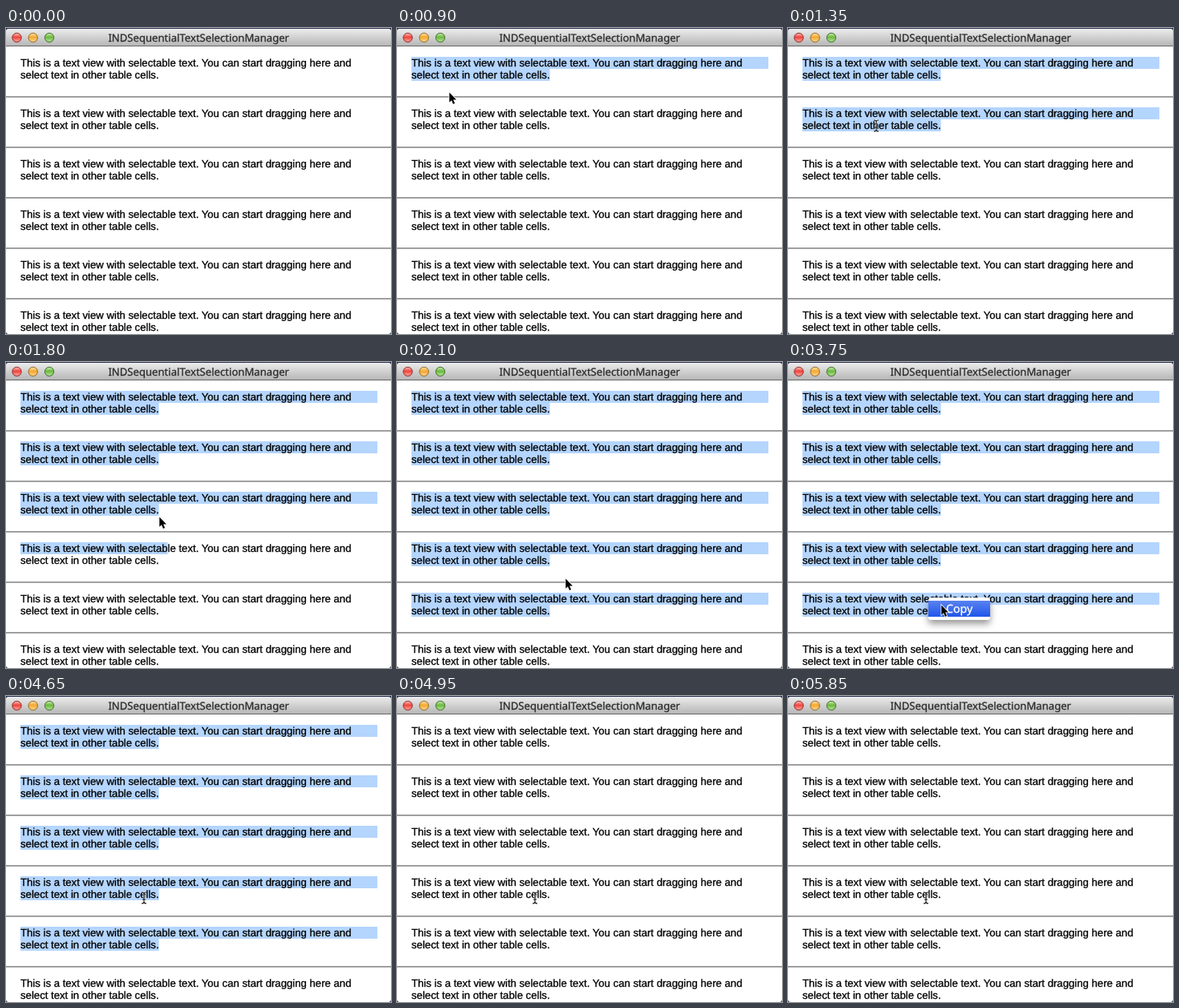
An HTML page for the animation above (6000 ms loop, 480 px wide and 382 px high).

```html
<!DOCTYPE html>
<html lang="en">
<head>
<meta charset="utf-8">
<title>Text selection across table cells</title>
<style>
  html, body { margin: 0; width: 100%; height: 100%; overflow: hidden; background: #fff; }
  svg { display: block; width: 100vw; height: 100vh; }
  text { text-rendering: geometricPrecision; white-space: pre; stroke-width: .3px; }
  .cell { font: 13.16px "Liberation Sans", Arial, sans-serif; fill: #000; stroke: #000; }
  .title { font: 13.12px "Noto Sans", sans-serif; fill: #2c2c2c; stroke: #2c2c2c; text-anchor: middle; }
  .item { font: 14.2px "Noto Sans", sans-serif; }
  .selection { fill: #b4d5fe; }
  .rule { fill: #808080; }
</style>
</head>
<body>
<svg viewBox="0 0 480 382" preserveAspectRatio="none">
  <defs>
    <linearGradient id="bar" x2="0" y2="1">
      <stop stop-color="#ececec"/><stop offset="1" stop-color="#b4b4b4"/>
    </linearGradient>
    <linearGradient id="blue" x2="0" y2="1">
      <stop stop-color="#5a83f0"/><stop offset="1" stop-color="#1f56ea"/>
    </linearGradient>
    <linearGradient id="gloss" x2="0" y2="1">
      <stop stop-color="#fff" stop-opacity=".6"/>
      <stop offset=".45" stop-color="#fff" stop-opacity="0"/>
      <stop offset="1" stop-color="#fff" stop-opacity=".5"/>
    </linearGradient>
    <filter id="shadow" x="-30%" y="-50%" width="160%" height="240%">
      <feDropShadow dx="0" dy="5" stdDeviation="4.5" flood-opacity=".4"/>
    </filter>
    <clipPath id="window"><rect y="1" width="480" height="381" rx="3.5"/></clipPath>
  </defs>

  <rect width="480" height="382" fill="#29304f"/>
  <g clip-path="url(#window)">
    <rect width="480" height="382" fill="#fff"/>
    <rect y="1" width="480" height="22" fill="url(#bar)"/>
    <rect y="22" width="480" height="1" fill="#686868"/>
    <g id="buttons"></g>
    <text class="title" x="240.2" y="16.5">INDSequentialTextSelectionManager</text>
    <g id="rows"></g>
  </g>

  <g id="menu">
    <rect x="175" y="294" width="77" height="28" rx="4" fill="#fff" filter="url(#shadow)"/>
    <rect id="highlight" x="175" y="298" width="77" height="20" fill="url(#blue)"/>
    <text id="copy" class="item" x="197" y="313">Copy</text>
  </g>

  <g id="arrow">
    <path d="M.3 .5V12.8L3 10.2 5 15 7.1 14.1 5.1 9.4H9Z"
          fill="#000" stroke="#fff" stroke-width="1.6" paint-order="stroke"/>
  </g>
  <g id="beam" fill="none">
    <path d="M-3-7Q0-7 0-5Q0-7 3-7M0-5V5M-3 7Q0 7 0 5Q0 7 3 7M-2 2H2" stroke="#fff" stroke-width="2.6" stroke-opacity=".7"/>
    <path d="M-3-7Q0-7 0-5Q0-7 3-7M0-5V5M-3 7Q0 7 0 5Q0 7 3 7M-2 2H2" stroke="#111" stroke-width="1.1"/>
  </g>
</svg>
<script>
const STEP = 150, LOOP = 6000;
const LEFT = 18, RIGHT = 463, TOP = 36, PITCH = 63, LINE = 15;
const LINES = [
  "This is a text view with selectable text. You can start dragging here and",
  "select text in other table cells."
];

// Pointer positions: [time, x, y], each held until the next one.
const PATH = [
  [150, 19, 44], [450, 24, 46], [600, 40, 53], [750, 56, 67], [900, 65, 80],
  [1050, 70, 92], [1200, 85, 104], [1350, 110, 122], [1500, 140, 146],
  [1650, 168, 170], [1800, 191, 193], [1950, 202, 232], [2100, 210, 270],
  [2250, 214, 304], [2400, 216, 328], [3000, 208, 322], [3150, 192, 308],
  [3300, 178, 296], [3450, 174, 293], [3750, 191, 303], [4350, 186, 285],
  [4500, 175, 262], [4650, 172, 252]
];
const DRAG_END = 2400, MENU_CLICK = 3150, MENU_OPEN = 3600, MENU_PICK = 3750,
      MENU_FADE = 4050, MENU_GONE = 4200, DESELECT = 4800;

const $ = id => document.getElementById(id);

function add(parent, tag, attrs, content = "") {
  const node = document.createElementNS("http://www.w3.org/2000/svg", tag);
  for (const key in attrs) node.setAttribute(key, attrs[key]);
  node.textContent = content;
  return parent.appendChild(node);
}

function show(node, visible) {
  node.style.display = visible ? "" : "none";
}

[[13.5, "#f0453c", "#8f3a35"], [33.7, "#f5a92c", "#94702f"], [54, "#6cba3c", "#4b7a38"]]
  .forEach(([cx, fill, stroke]) => {
    add($("buttons"), "circle", { cx, cy: 12, r: 5.7, fill, stroke });
    add($("buttons"), "circle", { cx, cy: 12, r: 5, fill: "url(#gloss)" });
  });

const rows = Array.from({ length: 6 }, (_, row) => {
  const top = TOP + row * PITCH;
  add($("rows"), "rect", { class: "rule", y: top + 49.2, width: 480, height: 1.5 });
  return LINES.map((content, i) => {
    const y = top + i * LINE;
    const mark = add($("rows"), "rect", { class: "selection", x: LEFT, y, width: 0, height: LINE });
    const text = add($("rows"), "text", { class: "cell", x: LEFT, y: y + 12 }, content);
    return { mark, text, y };
  });
});

// Right edges of the characters of each line, for snapping the selection.
const edges = rows[0].map(({ text }) => [LEFT,
  ...Array.from(text.textContent, (_, i) => text.getEndPositionOfChar(i).x)]);

const snap = (line, x) => edges[line].reduce((best, edge) =>
  Math.abs(edge - x) < Math.abs(best - x) ? edge : best);

function pointerAt(time) {
  return PATH.filter(([start]) => start <= time).pop();
}

function drawSelection(time) {
  // The selection runs one step ahead of the drawn pointer.
  const focus = time < DESELECT && pointerAt(Math.min(time + STEP, DRAG_END));
  rows.forEach(row => row.forEach(({ mark, y }, line) => {
    let end = LEFT;
    if (focus && time >= STEP && focus[2] >= y) {
      const whole = line === 0 ? RIGHT : edges[1][edges[1].length - 1];
      end = focus[2] < y + LINE ? snap(line, focus[1]) : whole;
    }
    mark.setAttribute("width", end - LEFT);
  }));
}

function drawPointer(time) {
  const point = pointerAt(time);
  const menuMode = time >= MENU_CLICK && time < MENU_GONE;
  const offset = point ? (point[2] - TOP) % PITCH : 0;
  const beam = !menuMode && offset < 2 * LINE;
  show($("arrow"), point && !beam);
  show($("beam"), point && beam);
  if (point) $(beam ? "beam" : "arrow").setAttribute("transform", `translate(${point[1]} ${point[2]})`);
}

function drawMenu(time) {
  const picked = time >= MENU_PICK;
  show($("menu"), time >= MENU_OPEN && time < MENU_GONE);
  show($("highlight"), picked);
  $("copy").style.fill = $("copy").style.stroke = picked ? "#fff" : "#000";
  $("menu").style.opacity = time < MENU_FADE ? 1 : 0.5;
}

const start = performance.now();
function frame() {
  const time = Math.floor((performance.now() - start) % LOOP / STEP) * STEP;
  drawSelection(time);
  drawPointer(time);
  drawMenu(time);
  requestAnimationFrame(frame);
}
frame();
</script>
</body>
</html>
```
